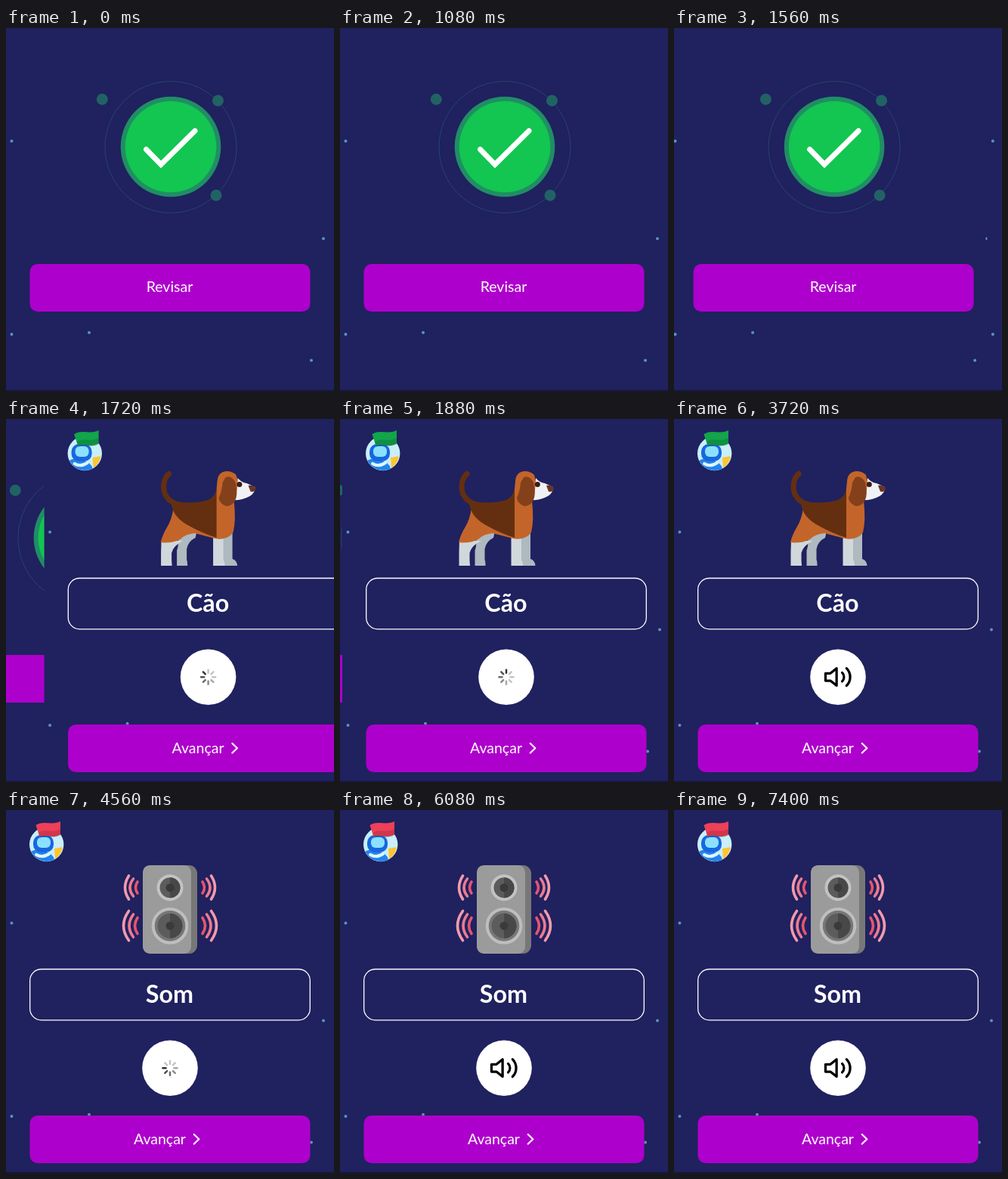
Animation of 434x480 px, one loop 7440 ms. Source, as an HTML page:

```html
<!DOCTYPE html>
<html lang="pt">
<head>
<meta charset="utf-8">
<title>Quiz</title>
<style>
  html, body { margin: 0; width: 100%; height: 100%; overflow: hidden; background: #20215f; }
  svg { display: block; width: 434px; height: 480px; }
  text { font: 19.5px Lato, sans-serif; fill: #fff; text-anchor: middle; }
  .word { font-size: 32.3px; font-weight: 700; }
  .line { fill: none; stroke-linecap: round; stroke-linejoin: round; }
</style>
</head>
<body>
<svg viewBox="0 0 434 480">
  <defs>
    <g id="backdrop">
      <rect width="434" height="480" fill="#20215f"/>
      <path class="line" stroke="#5d94b4" stroke-width="4"
        d="M7.5 149.5h0M420 278.5h0M7.5 405h0M110 402.7h0M404 439.5h0"/>
      <rect y="478.7" width="434" height="1.3" fill="#16173f"/>
    </g>
    <rect id="button" x="31.5" width="371" height="63" rx="10.5" fill="#ae00cc"/>
    <g id="waves" class="line" stroke-width="3.6">
      <path stroke="#e4566f" d="M260 95q5 7.500 0 15M260 142.500q7 10.500 0 21"/>
      <path stroke="#ec7b90" d="M265.500 91q9 11.500 0 23M265.500 138q11 15 0 30"/>
      <path stroke="#f29aae" d="M271.500 87q10 15.500 0 31M271.500 133.500q14 19.500 0 39"/>
    </g>
  </defs>

  <g id="result">
    <use href="#backdrop"/>
    <circle cx="218" cy="157.500" r="87" fill="none" stroke="#24466a"/>
    <circle cx="218" cy="157" r="66.300" fill="#208e64"/>
    <circle cx="218" cy="157" r="60.300" fill="#13c551"/>
    <path d="M127.300 94.300h0M280.500 96h0M278 221.200h0" class="line" stroke="#216364" stroke-width="15"/>
    <path d="M185.500 160.500L205 180.500L250 136" fill="none" stroke="#fff" stroke-width="7" stroke-linecap="round"/>
    <use href="#button" y="312"/>
    <text x="216.500" y="349.300">Revisar</text>
  </g>

  <g id="card">
    <use href="#backdrop"/>

    <circle cx="53.700" cy="45.500" r="22.700" fill="#c9effb"/>
    <path d="M64 51l11-2q-2 10-10 16z" fill="#ffc530"/>
    <path d="M33 55q7-5 17 0q12 1 14 11q-20 7-31-11z" fill="#2384ee"/>
    <rect x="36" y="33" width="27" height="23" rx="10" fill="#1767df"/>
    <rect x="41" y="36" width="18" height="14" rx="6" fill="#8ce0ff"/>
    <path d="M40 59q8 5 17-1" class="line" stroke="#dff7ff" stroke-width="4"/>
    <g id="flag">
      <path d="M39.500 20C51 13 59 21 72 15V32.500C61 39 53 31 44.500 35.500Z"/>
      <path d="M43 30C53 24 61 31 72 25V33.500C61 40 53 32 45 37.500Z" fill="#000" fill-opacity=".13"/>
    </g>

    <g id="dog">
      <path d="M176 151L202 148L200 157Q190 162 188.500 172V186Q189.500 188 189.500 194H175.500V174Q179 165 176 151Z" fill="#aeb9c0"/>
      <path d="M155 161H184Q171 167 168.500 177V186.500L169 194H154.500V176Z" fill="#d1d8dc"/>
      <path d="M236 151H249V185Q255 187 255.500 194H236Z" fill="#aeb9c0"/>
      <path d="M223.500 151H237V186Q239 189 239 194H223.500Z" fill="#d1d8dc"/>
      <path d="M171 117Q169 133 162 144Q157 152 154 163Q168 165 180 159Q187 152 199 151L226 158Q242 161 250 150Q254 134 251 108L258 90L254 74Q249 69 241 69Q230 70 229 82L226 112Z" fill="#c3652a"/>
      <path d="M174 109Q198 113 217 107Q227 102 228 91V157Q209 151 193 142Q169 130 168 110Z" fill="#642f10"/>
      <path d="M165 72.500C154 82 154 107 178 113" class="line" stroke="#642f10" stroke-width="7"/>
      <path d="M256 78Q261 84 268 85L279 90Q279 98 272 102Q261 108 252 107Q256 95 256 78Z" fill="#f0f1f4"/>
      <path d="M270 88Q278 87 280 92Q279 97 273 96Z" fill="#6a3425"/>
      <circle cx="258.300" cy="86.500" r="3.500" fill="#3b1c14"/>
      <path d="M240 77Q248 74 253 84Q257 101 252 109Q247 116 240 115Q231 111 231 104Q235 96 236 84Z" fill="#84401b"/>
    </g>

    <g id="speaker">
      <rect x="181" y="73" width="72" height="117" rx="11" fill="#777"/>
      <path d="M192 73H234Q245 73 245 84V179Q245 190 234 190H192Q181 190 181 179V84Q181 73 192 73Z" fill="#9b9b9b"/>
      <circle cx="217" cy="102.700" r="15.500" fill="#5c5c5c" stroke="#c3c3c3" stroke-width="4"/>
      <path d="M217 89.200a13.500 13.500 0 0 1 0 27z" fill="#484848"/>
      <circle cx="217" cy="102.700" r="5.500" fill="#3a3a3a"/>
      <circle cx="217" cy="153.200" r="22.300" fill="#777" stroke="#bebebe" stroke-width="4"/>
      <circle cx="217" cy="153.200" r="16.500" fill="#5c5c5c"/>
      <path d="M217 136.700a16.500 16.500 0 0 1 0 33z" fill="#484848"/>
      <circle cx="217" cy="153.200" r="5.500" fill="#3a3a3a"/>
      <use href="#waves"/>
      <use href="#waves" transform="matrix(-1 0 0 1 434 0)"/>
    </g>

    <rect x="31.700" y="210.500" width="370.600" height="67.300" rx="15" fill="none" stroke="#fff" stroke-width="1.300"/>
    <text id="word" class="word" x="216.500" y="254.700"></text>

    <circle cx="217" cy="341.200" r="36.800" fill="#fff"/>
    <g id="spinner" class="line" transform="translate(217 341.200)" stroke="#222" stroke-width="2.500"></g>
    <g id="sound" class="line" transform="translate(197.200 321.600) scale(1.630)" stroke="#000" stroke-width="2">
      <path d="M11 5L6 9H2V15H6L11 19ZM19.070 4.930a10 10 0 0 1 0 14.140M15.540 8.460a5 5 0 0 1 0 7.070"/>
    </g>

    <use href="#button" y="404"/>
    <text x="203.500" y="441.500">Avançar</text>
    <path d="M248.800 429L255.300 435.300L248.800 441.500" class="line" stroke="#fff" stroke-width="2.200"/>
  </g>
</svg>
<script>
const LOOP = 7440, WIDTH = 434;
const PUSH = 1545, NEXT = 4280;
const $ = id => document.getElementById(id);
const show = (id, on) => $(id).setAttribute('display', on ? 'inline' : 'none');
const slide = (id, x) => $(id).setAttribute('transform', `translate(${x} 0)`);

$('spinner').innerHTML = Array.from({ length: 8 }, (_, i) =>
  `<path d="M0 -5.500V-9.500" transform="rotate(${i * 45})"/>`).join('');
const spokes = [...$('spinner').children];

// Critically damped spring, 0 to 1
function spring(ms) {
  const x = Math.max(0, ms) * 0.021;
  return 1 - Math.exp(-x) * (1 + x);
}

function draw(t) {
  const p = spring(t - PUSH);
  slide('result', -0.3 * WIDTH * p);
  slide('card', WIDTH * (1 - p));

  const second = t >= NEXT;
  show('dog', !second);
  show('speaker', second);
  $('word').textContent = second ? 'Som' : 'Cão';
  $('flag').setAttribute('fill', second ? '#ee4058' : '#12a54b');

  const loading = t < (second ? 5400 : 2700);
  show('spinner', loading);
  show('sound', !loading);
  const head = Math.floor((t - (second ? 4540 : 1790)) / 100) + (second ? 6 : 8);
  spokes.forEach((spoke, i) => {
    const age = (((head - i) % 8) + 8) % 8;
    spoke.setAttribute('stroke-opacity', Math.max(0.27, 0.92 - age * 0.13));
  });
}

function tick() {
  draw(performance.now() % LOOP);
  requestAnimationFrame(tick);
}
tick();
</script>
</body>
</html>
```
